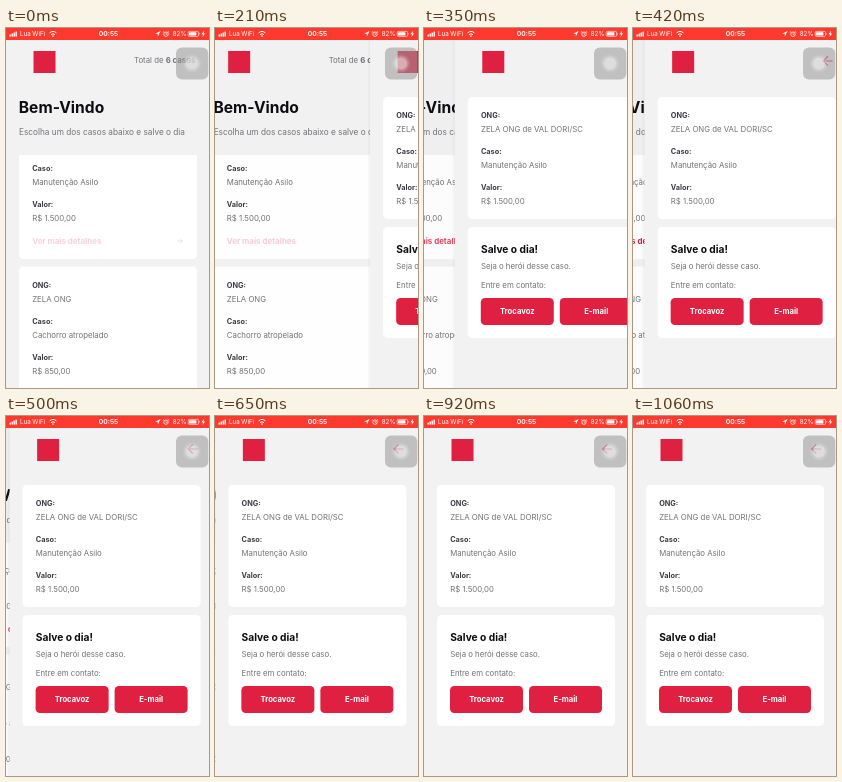
Write an HTML page that moves like this. It is 203 px wide and 360 px high and loops after 1.09 s.

```html
<!DOCTYPE html>
<html lang="pt-BR">
<head>
<meta charset="utf-8">
<title>Casos</title>
<style>
  html, body { margin: 0; width: 100%; height: 100%; overflow: hidden; background: #f2f2f2; }
  svg { display: block; width: 100%; height: 100%; }
  text { font-family: Inter, Roboto, sans-serif; white-space: pre; }
  .bold, .label, .title, .button { font-weight: 700; }
  .title { fill: #0c0c12; }
  .label { fill: #3c3c46; font-size: 7.3px; }
  .value { fill: #737378; font-size: 7.8px; }
  .link { fill: #e02041; font-size: 7.95px; }
  .button { fill: #fff; font-size: 7.7px; text-anchor: middle; }
  .status { fill: #fff; font-size: 6.2px; }
</style>
</head>
<body>
<svg viewBox="0 0 203 360" preserveAspectRatio="none">
  <defs>
    <clipPath id="listArea"><rect y="127" width="203" height="240"/></clipPath>
    <linearGradient id="edge">
      <stop offset="0" stop-color="#000" stop-opacity="0"/>
      <stop offset="1" stop-color="#000" stop-opacity=".05"/>
    </linearGradient>
  </defs>
  <g id="listPage"></g>
  <rect id="dim" width="203" height="360"/>
  <g id="detailPage"></g>
  <g id="touchButton">
    <rect x="170" y="19.5" width="32.3" height="32" rx="6" fill="#989898" fill-opacity=".55"/>
    <circle cx="186" cy="35.5" r="9.3" fill="#fff" fill-opacity=".1"/>
    <circle cx="186" cy="35.5" r="7.6" fill="#fff" fill-opacity=".17"/>
    <circle cx="186" cy="35.5" r="6" fill="#fff" fill-opacity=".3"/>
  </g>
  <g id="statusBar"></g>
</svg>
<script>
const WIDTH = 203, LOOP = 1090, PUSH_START = 157, LINK_START = 180;
const STEPS = [0, 140, 210, 280, 350, 420, 500, 570, 650, 700, 770, 850, 920, 990, 1060];
const RED = '#e02041';
const byId = id => document.getElementById(id);

const text = (x, y, cls, content, attrs = '') =>
  `<text x="${x}" y="${y}" class="${cls}" ${attrs}>${content}</text>`;
const card = (y, height) =>
  `<rect x="13" y="${y}" width="178" height="${height}" rx="4.3" fill="#fff"/>`;
const background = '<rect width="203" height="360" fill="#f2f2f2"/>';
const logo = `<rect x="27.5" y="23" width="22" height="22" fill="${RED}"/>`;

// Label and value pairs, stacked 36 units apart
const fields = (top, pairs) => pairs.map(([label, value], i) =>
  text(26.2, top + 20.8 + 36 * i, 'label', label + ':') +
  text(26.2, top + 34.9 + 36 * i, 'value', value)).join('');

const arrow = (x, y, length, head, stroke) =>
  `<path d="M${x} ${y}h${length}m${-head} ${-head}l${head} ${head}l${-head} ${head}"
    fill="none" stroke="${RED}" stroke-width="${stroke}"/>`;

const button = (x, label) =>
  `<rect x="${x}" y="269.9" width="73" height="27.1" rx="4.3" fill="${RED}"/>` +
  text(x + 36.5, 286.2, 'button', label);

byId('listPage').innerHTML = background + logo +
  text(128, 35.4, 'value', 'Total de <tspan class="bold">6 casos</tspan>') +
  text(12.8, 85.3, 'title', 'Bem-Vindo', 'font-size="15.6"') +
  text(13, 107.3, 'value', 'Escolha um dos casos abaixo e salve o dia', 'style="font-size:8.25px"') +
  '<g clip-path="url(#listArea)">' +
    card(86, 145) +
    fields(86, [['ONG', 'ZELA ONG'], ['Caso', 'Manutenção Asilo'], ['Valor', 'R$ 1.500,00']]) +
    '<g id="more">' +
      text(26.2, 215.8, 'link bold', 'Ver mais detalhes') +
      arrow(171.5, 213, 4.8, 2.2, .8) +
    '</g>' +
    card(238.6, 145) +
    fields(238.8, [['ONG', 'ZELA ONG'], ['Caso', 'Cachorro atropelado'], ['Valor', 'R$ 850,00']]) +
  '</g>';

byId('detailPage').innerHTML =
  '<rect x="-3" width="3" height="360" fill="url(#edge)"/>' + background + logo +
  `<path d="M188 33h-9.4m4.6 -4.6l-4.6 4.6l4.6 4.6" fill="none" stroke="${RED}" stroke-width="1.1"/>` +
  card(69, 122) +
  fields(69, [['ONG', 'ZELA ONG de VAL DORI/SC'], ['Caso', 'Manutenção Asilo'], ['Valor', 'R$ 1.500,00']]) +
  card(199, 111) +
  text(26.2, 224.7, 'title', 'Salve o dia!', 'font-size="10.2"') +
  text(26.2, 241.1, 'value', 'Seja o herói desse caso.') +
  text(26.2, 259.5, 'value', 'Entre em contato:') +
  button(26, 'Trocavoz') + button(105, 'E-mail');

const signal = [2, 3, 4, 5].map((h, i) =>
  `<rect x="${3.5 + i * 2}" y="${8.3 - h}" width="1.4" height="${h}" fill="#fff"/>`).join('');

byId('statusBar').innerHTML =
  '<rect width="203" height="12" fill="#fd3a2d"/>' +
  '<g transform="translate(0 .3)">' + signal +
  text(14, 8, 'status', 'Lua WiFi') +
  `<g fill="none" stroke="#fff" stroke-width="1">
    <path d="M43.6 4.6q3.4 -3 6.8 0M45 6.3q2 -1.7 4 0"/>
    <path d="M158.2 3.1l-1.4 1M161.8 3.1l1.4 1" stroke-width=".7"/>
    <circle cx="160" cy="5.9" r="2.2" stroke-width=".8"/>
    <path d="M160 4.6v1.5h1.1" stroke-width=".6"/>
    <rect x="182.2" y="3.1" width="10.4" height="5" rx="1.2" stroke-width=".6"/>
  </g>
  <circle cx="47" cy="7.8" r=".8" fill="#fff"/>
  <path d="M154.6 2.8l-5.6 2.6h2.8v2.8z" fill="#fff"/>
  <rect x="183" y="3.9" width="7.4" height="3.4" rx=".6" fill="#fff"/>
  <path d="M193.2 4.7v1.8l.8 -.9zM198.2 2.4l-2.8 3.6h1.7l-.7 2.7l2.8 -3.6h-1.7z" fill="#fff"/>` +
  text(102.5, 8.1, 'status', '00:55', 'text-anchor="middle" style="font-size:6.8px;font-weight:600"') +
  text(166.8, 8, 'status', '82%') + '</g>';

// Critically damped spring from 0 to 1
function springProgress(ms) {
  const u = Math.max(0, ms) * 0.0174;
  return 1 - (1 + u) * Math.exp(-u);
}

function easeInOut(p) {
  return p < .5 ? 2 * p * p : 1 - 2 * (1 - p) * (1 - p);
}

function render(ms) {
  const time = STEPS.filter(step => step <= ms).pop();
  const progress = springProgress(time - PUSH_START);
  const fade = Math.min(1, Math.max(0, (time - LINK_START) / 250));
  byId('listPage').setAttribute('transform', `translate(${-.3 * WIDTH * progress})`);
  byId('detailPage').setAttribute('transform', `translate(${WIDTH * (1 - progress)})`);
  byId('detailPage').setAttribute('visibility', progress > 0 ? 'visible' : 'hidden');
  byId('dim').setAttribute('opacity', .015 * progress);
  byId('more').setAttribute('opacity', .2 + .8 * easeInOut(fade));
}

const start = performance.now();
function tick() {
  render((performance.now() - start) % LOOP);
  requestAnimationFrame(tick);
}
tick();
</script>
</body>
</html>
```
